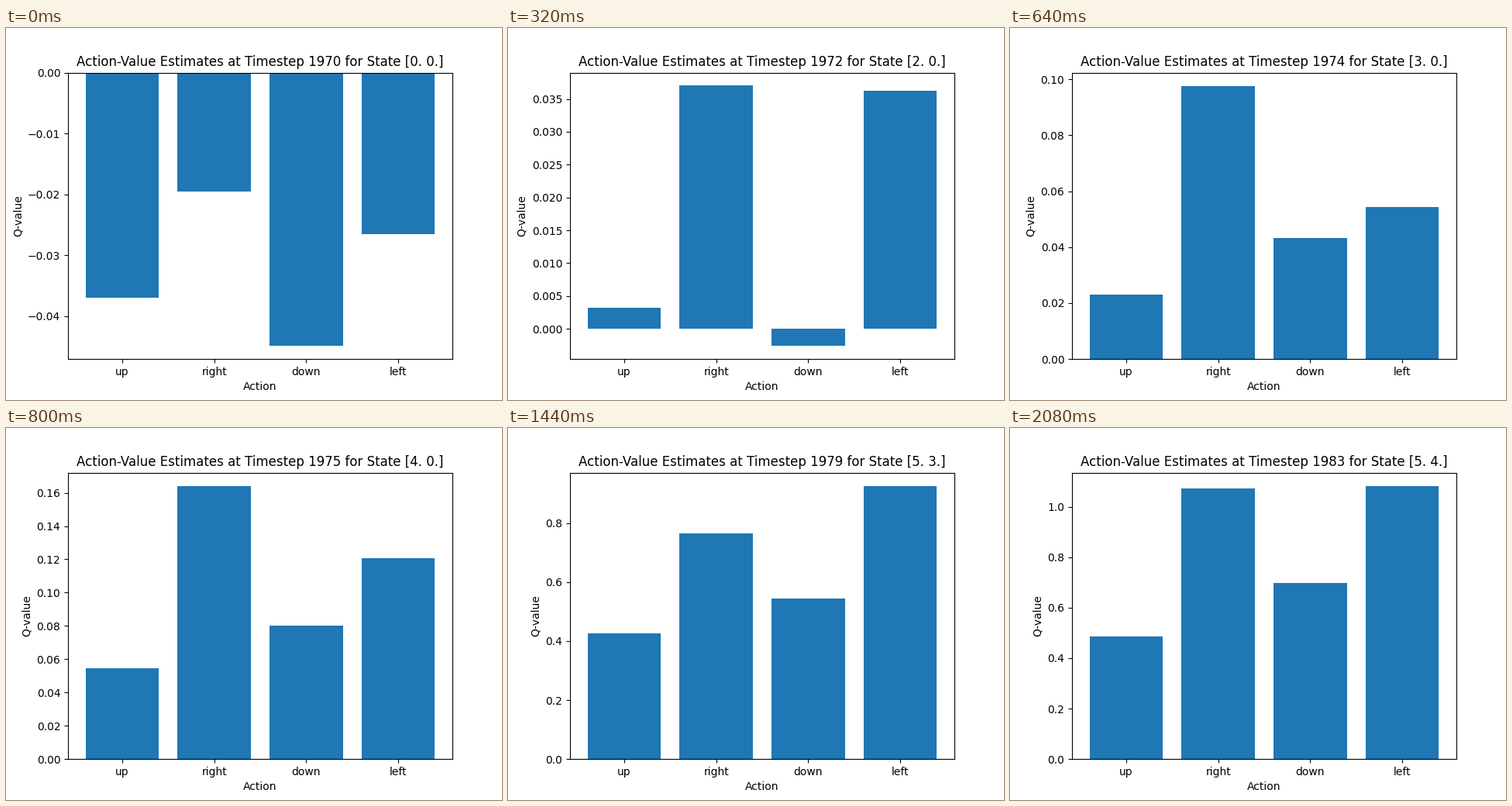
These frames come from a looping animation (640 px wide and 480 px high, 2240 ms). A matplotlib script:

```python
import matplotlib.pyplot as plt
import numpy as np
from matplotlib.animation import FuncAnimation

FIRST_STEP = 1970
ACTIONS = ["up", "right", "down", "left"]

# The agent's walk over the grid, one letter per timestep
MOVES = {"E": (1, 0), "W": (-1, 0), "N": (0, 1), ".": (0, 0)}
WALK = ".EE.EEENNNN.WE"
states = np.cumsum([MOVES[m] for m in WALK], axis=0).astype(float)

# Q-values known at a few distances from the start, ordered as ACTIONS
KNOWN_Q = {
    0: (-0.03695, -0.0195, -0.0448, -0.0265),
    2: (0.0032, 0.03703, -0.00262, 0.03625),
    3: (0.0231, 0.0975, 0.0433, 0.0544),
    6: (0.1707, 0.438, 0.2212, 0.48),
    8: (0.4265, 0.7657, 0.5448, 0.925),
    9: (0.4857, 1.0737, 0.6976, 1.0808),
}
LINEAR_RANGE = 0.05


def q_values(state):
    """Interpolate linearly near zero and geometrically further out."""
    dist = state.sum()
    scaled = np.arcsinh(np.array(list(KNOWN_Q.values())) / LINEAR_RANGE)
    mixed = [np.interp(dist, list(KNOWN_Q), column) for column in scaled.T]
    return LINEAR_RANGE * np.sinh(mixed)


fig, ax = plt.subplots(figsize=(6.4, 4.8), dpi=100)


def draw(i):
    ax.clear()
    ax.bar(ACTIONS, q_values(states[i]))
    ax.set_xlabel("Action")
    ax.set_ylabel("Q-value")
    ax.set_title(
        f"Action-Value Estimates at Timestep {FIRST_STEP + i} "
        f"for State {states[i]}"
    )


anim = FuncAnimation(
    fig, draw, frames=len(WALK), init_func=lambda: None,
    interval=160, repeat=True, repeat_delay=0,
)
plt.show()
```
